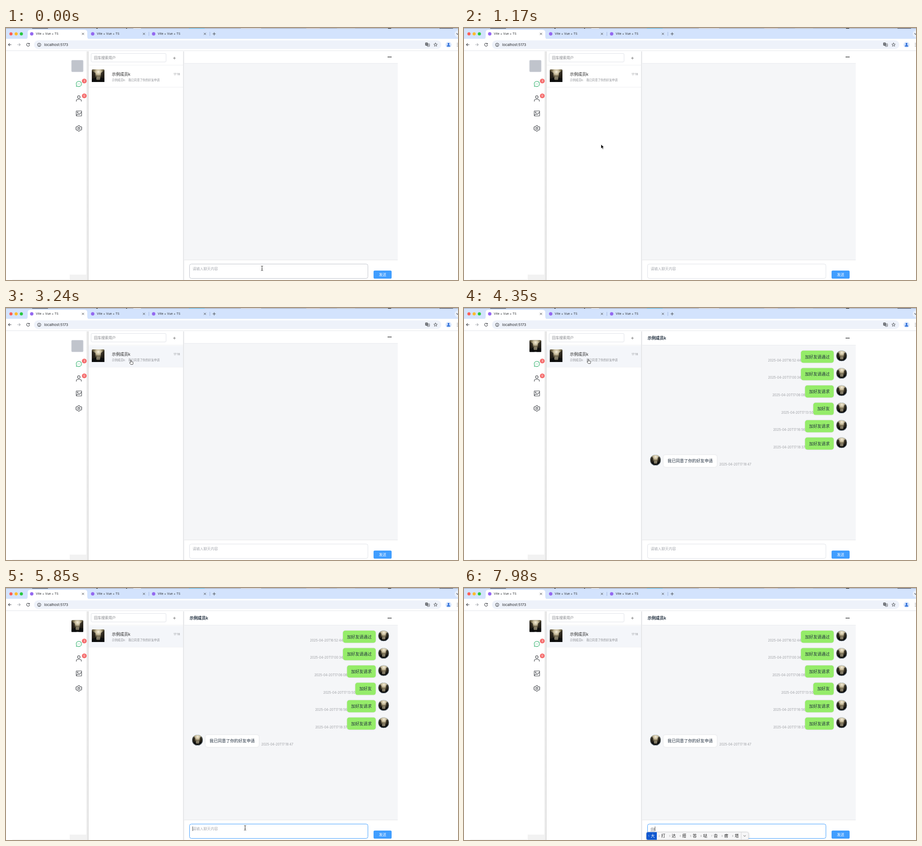
An HTML page for the animation above (8 s loop, 1001 by 560 pixels).

```html
<!DOCTYPE html>
<html>
<head>
<meta charset="utf-8">
<title>Chat demo</title>
<style>
  html, body { margin: 0; width: 100%; height: 100%; overflow: hidden; background: #fff; }
  svg { display: block; }
  text { font-family: Inter, "Noto Sans CJK SC", "Noto Sans CJK", sans-serif; white-space: pre; }
  .line { fill: none; stroke: #484b50; stroke-linecap: round; stroke-linejoin: round; }
</style>
</head>
<body>
<svg width="1001" height="560" viewBox="0 0 1001 560">
  <defs>
    <linearGradient id="wall" x2="0" y2="1">
      <stop offset="0" stop-color="#5b5239"/><stop offset=".5" stop-color="#37301f"/><stop offset="1" stop-color="#0d0e0d"/>
    </linearGradient>
    <radialGradient id="glow" cx=".52" cy=".2" r=".5">
      <stop offset="0" stop-color="#f7f0dc"/><stop offset=".45" stop-color="#d8cba8" stop-opacity=".85"/><stop offset="1" stop-color="#8a7c58" stop-opacity="0"/>
    </radialGradient>
    <linearGradient id="edge">
      <stop offset="0" stop-color="#f7f7f7"/><stop offset="1" stop-color="#dcdcdc"/>
    </linearGradient>
    <clipPath id="round"><circle cx="14" cy="14" r="14"/></clipPath>
    <g id="photo">
      <rect width="28" height="28" rx="2" fill="url(#wall)"/>
      <rect width="28" height="28" rx="2" fill="url(#glow)"/>
      <path d="M0 3L8 8V17L0 21ZM28 2L20 8V17L28 21Z" fill="#1d1a14" opacity=".75"/>
      <path d="M11 16H18L20 23H9Z" fill="#a59c83" opacity=".7"/>
      <path d="M0 21L9 18L12 28H0ZM28 20L19 18L17 28H28Z" fill="#0c0d0d"/>
    </g>
    <g id="face">
      <g transform="scale(.857) translate(-14 -14)" clip-path="url(#round)"><use href="#photo"/></g>
      <circle r="11.7" fill="none" stroke="#c5dcf2" stroke-width=".7"/>
    </g>
  </defs>

  <!-- browser -->
  <rect width="1001" height="25" fill="#d3e3fd"/>
  <g id="strip"></g>
  <circle cx="11" cy="13" r="3.5" fill="#ff5f57"/>
  <circle cx="22.5" cy="13" r="3.5" fill="#febc2e"/>
  <circle cx="34" cy="13" r="3.5" fill="#28c840"/>
  <path d="M42 25Q48 25 48 19V10Q48 4 54 4H174Q180 4 180 10V19Q180 25 186 25Z" fill="#fff"/>
  <rect y="24" width="1001" height="27" fill="#fff"/>
  <rect x="62" y="27.5" width="902" height="19" rx="9.5" fill="#eef2fa"/>
  <path d="M0 50.5H1001" stroke="#e3e5e9"/>
  <g id="tabs"></g>
  <circle cx="1001" cy="13" r="7.5" fill="#e8f0fe"/>
  <g class="line" stroke-width="1.1">
    <path d="M316.5 9V17M451.5 9V17" style="stroke:#a4b9df"/>
    <path d="M458 13H464M461 10V16M998 12L1000.500 14.500"/>
    <path d="M11.500 37H5.500M8 34.300L5.300 37L8 39.700"/>
    <path d="M25.500 37H31.500M29 34.300L31.700 37L29 39.700" style="stroke:#a9acb1"/>
    <path d="M51.600 35.200A3.300 3.300 0 1 0 52.100 38M52 33.700V35.800H49.800"/>
    <circle cx="73.500" cy="37.300" r="3.600"/><path d="M73.500 37V39M73.500 35.300V35.400"/>
    <path d="M951.300 33.200L952.400 35.800L955.200 36L953.100 37.800L953.800 40.600L951.300 39.100L948.800 40.600L949.500 37.800L947.400 36L950.200 35.800Z" stroke-width=".9"/>
    <rect x="932.500" y="35" width="5.500" height="6" rx=".7" stroke-width=".8"/>
    <path d="M934 39.500L935.300 36.500L936.600 39.500" stroke-width=".7"/>
  </g>
  <rect x="928.500" y="32.500" width="5.500" height="6.500" rx=".8" fill="#50545a"/>
  <path d="M929.700 34.800H932.800M931.200 34V34.800M932.300 35L930 37.500M930.300 35.500L932.500 37.500" stroke="#fff" stroke-width=".5"/>
  <circle cx="980" cy="37.300" r="6.500" fill="#d3e3fd"/>
  <circle cx="980" cy="35.500" r="1.900" fill="#0b57d0"/><path d="M976.300 41Q976.300 38.300 980 38.300T983.700 41Z" fill="#0b57d0"/>
  <path d="M999.500 33.500V34.500M999.500 36.800V37.800M999.500 40.100V41.100" stroke="#484b50" stroke-width="1.500"/>

  <!-- side bar -->
  <rect x="177.500" y="52" width="5.500" height="508" fill="url(#edge)"/>
  <rect x="141" y="548" width="37" height="12" fill="#f2f2f2"/>
  <path d="M14 559.500H140" stroke="#f1f1f1"/>
  <rect x="145" y="71.500" width="26" height="26" rx="2" fill="#c0c4cc" stroke="#d9dce2"/>
  <g class="line" stroke-width="1.100">
    <g style="stroke:#2aae67"><path d="M155.700 129.800L156.200 127.200A6 5.800 0 1 1 158.200 129.200Z"/><path d="M158.700 124.300H158.800M161.400 124.300H161.500M164.100 124.300H164.200" stroke-width="1.300"/></g>
    <circle cx="161.300" cy="153.500" r="2.900"/><path d="M155.800 163V161.500Q155.800 158.800 158.500 158.800H164.100Q166.800 158.800 166.800 161.500V163"/>
    <rect x="155.500" y="184.300" width="12" height="11.200" rx=".8"/><circle cx="158.800" cy="187.500" r=".9"/><path d="M155.800 194L160 190.500L162 192.200L167.300 187"/>
    <circle cx="161.300" cy="223" r="2.100"/>
    <path d="M159.800 216.800H162.800L163.500 218.700L165.300 219.700L167.200 219.300L168 222L166.700 223L168 224.300L166.800 226.800L164.900 226.500L163.400 227.400L162.700 229.300H159.900L159.200 227.400L157.600 226.500L155.700 226.800L154.600 224.200L155.900 223L154.600 221.700L155.700 219.300L157.600 219.600L159.200 218.700Z"/>
  </g>
  <g fill="#f56c6c"><circle cx="173.400" cy="117.700" r="5.300"/><circle cx="173.400" cy="150.700" r="5.300"/></g>

  <!-- conversation list -->
  <path d="M183 560V55Q183 52 186 52H390Q393 52 393 55V560Z" fill="#fff"/>
  <path d="M183.500 82.500H392M183.500 131.500H392" stroke="#eff0f2"/>
  <rect id="item" x="183" y="84" width="209.500" height="47.500" fill="#f4f6fa"/>
  <rect x="188.500" y="56.500" width="166" height="19" rx="2.500" fill="#fff" stroke="#dfe2e8"/>
  <path class="line" d="M370.500 67H375.500M373 64.500V69.500" style="stroke:#777"/>
  <use href="#photo" x="190" y="92"/>

  <!-- conversation -->
  <rect x="392" y="52" width="2.500" height="508" fill="#e6e7e9"/>
  <rect id="area" x="394.500" width="473" fill="#f5f6f8"/>
  <path id="rule" stroke="#e9ebee"/>
  <path d="M394.500 515.500H867.500" stroke="#e4e5e8"/>
  <g id="dots" fill="#303133"><circle cx="846.500" r="1.150"/><circle cx="849.500" r="1.150"/><circle cx="852.500" r="1.150"/></g>
  <rect id="box" x="406.500" y="524.500" width="395" height="32" rx="4" fill="#fff"/>
  <rect x="814" y="539" width="40" height="18" rx="2.800" fill="#409eff"/>
  <g id="labels"></g>
  <g id="chat"><use href="#photo" transform="translate(145 71.500) scale(.93)"/></g>

  <g id="prompt"></g>
  <g id="typed"></g>
  <path id="caret" stroke="#222" stroke-width=".8"/>
  <g id="ime"></g>

  <g id="cursor">
    <path d="M0 0V9.500L2.200 7.500L3.800 11L5.300 10.300L3.800 7H6.700Z" fill="#000" stroke="#fff" stroke-width=".7"/>
    <path d="M-.8 6V.7Q0-.5.9.7V3.800L4.500 4.800Q5.400 5.200 5.200 6.500L4.300 10H-.3L-3 6.500Q-2.800 5-1.500 5.600Z" fill="#fff" stroke="#222" stroke-width=".8"/>
    <path d="M-2.300-5.200Q0-5.200 0-4Q0-5.200 2.300-5.200M0-4.200V4.200M-2.300 5.200Q0 5.200 0 4Q0 5.200 2.300 5.200M-1 1.500H1" fill="none" stroke="#222" stroke-width=".9"/>
  </g>
</svg>
<script>
const $ = id => document.getElementById(id);
const add = (id, markup) => $(id).insertAdjacentHTML('beforeend', markup);
const text = (id, x, y, size, color, str, extra = '') =>
  add(id, `<text x="${x}" y="${y}" font-size="${size}" fill="${color}" ${extra}>${str}</text>`);
const END = 'text-anchor="end"', MID = 'text-anchor="middle"';
const NAME = '示例成员k', REPLY = '我已同意了你的好友申请';

// sliver of the windows behind the browser
add('strip', '<rect width="1001" height="1.500" fill="#a9b2c2"/>');
[[58, 35, '#45484f'], [200, 3, '#222'], [266, 2, '#222'], [282, 17, '#e8e8e8'], [405, 35, '#6fc0e6'],
 [520, 45, '#d9dade'], [665, 30, '#d5c9c7'], [733, 40, '#c3c8ce'], [846, 7, '#222'], [960, 30, '#555a66']]
  .forEach(([x, w, c]) => add('strip', `<rect x="${x}" width="${w}" height="1.300" fill="${c}"/>`));

for (const x of [0, 135, 270]) {
  add('tabs', `<circle cx="${57 + x}" cy="13" r="3.800" fill="#9468f0"/>
    <path class="line" d="M${168.5 + x} 11l4 4m0-4l-4 4"/>`);
  text('tabs', 66 + x, 15.300, 6.750, '#2b2d31', 'Vite + Vue + TS');
}
text('labels', 84.500, 40, 7.900, '#25272b', 'localhost:5173');
text('labels', 173.400, 120.200, 6.500, '#fff', '3', MID);
text('labels', 173.400, 153.200, 6.500, '#fff', '0', MID);
text('labels', 195, 69, 8, '#7f8186', '回车搜索用户');
text('labels', 234.500, 105.500, 9, '#222', NAME);
text('labels', 385.500, 104.600, 6.300, '#8b8d92', '17:18', END);
text('labels', 234.500, 117.700, 6.300, '#8b8d92', NAME + ':');
text('labels', 271, 117.700, 6.300, '#8b8d92', REPLY);
text('labels', 834, 551, 8, '#fff', '发送', MID);
text('prompt', 413.300, 537.500, 8, '#a8abb2', '请输入聊天内容');

// messages
text('chat', 406.500, 70, 9, '#1f2d3d', NAME, 'font-weight="600"');
const bubble = (x, y, w, fill, str) => {
  add('chat', `<rect x="${x}" y="${y}" width="${w}" height="27" rx="5" fill="${fill}" style="filter:drop-shadow(0 .5px 1px #0002)"/>`);
  text('chat', x + 9, y + 16.700, 9.100, '#1f2d3d', str);
};
const stamp = (x, y, time, extra) => text('chat', x, y + 24, 6.900, '#9a9ca1', '2025-04-20T' + time, extra);
const face = (x, y) => add('chat', `<use href="#face" x="${x}" y="${y + 11.500}"/>`);
[['加好友请通过', '16:52:44'], ['加好友请通过', '17:00:34'], ['加好友请求', '17:06:08'],
 ['加好友', '17:13:50'], ['加好友请求', '17:16:56'], ['加好友请求', '17:18:37']].forEach(([str, time], i) => {
  const y = 94.800 + 38.600 * i, w = 18 + 9.100 * str.length, x = 818.800 - w;
  bubble(x, y, w, '#95ec69', str);
  stamp(x, y, time, END);
  face(836.300, y);
});
bubble(441.800, 326.400, 118.200, '#fff', REPLY);
stamp(565.500, 326.400, '17:18:47');
face(424, 326.400);

// input method candidates
add('ime', `<rect x="404" y="542.500" width="226" height="17" rx="3.500" fill="#f6f6f7" stroke="#c9cacd" stroke-width=".7" style="filter:drop-shadow(0 1px 2px #0003)"/>
  <path d="M427 542.500H407.500Q404 542.500 404 546V556Q404 559.500 407.500 559.500H427Z" fill="#0f58d0"/>
  <path d="M614 543V559" stroke="#d5d6d8"/><path class="line" d="M619.300 550l2.200 2 2.200-2" style="stroke:#555"/>`);
[...'大打达搭答哒沓瘩塔'].forEach((c, i) => {
  const x = 418 + 23.250 * i;
  text('ime', x - 9, 553, 4.500, i ? '#888' : '#fff', i + 1, MID);
  text('ime', x, 554.200, 9, i ? '#222' : '#fff', c, MID);
});

// pointer stops: time, x, y
const stops = [[0, 567, 534], [450, 567, 534], [870, 333, 295], [1050, 333, 295], [1170, 303.500, 258.500],
  [1650, 303.500, 258.500], [2010, 276.500, 115.500], [3240, 276.500, 115.500], [3241, 275.500, 113.500], [4800, 275.500, 113.500],
  [5250, 475, 430], [5430, 475, 430], [5760, 529.500, 533], [6630, 529.500, 533], [6870, 420.500, 534.500], [8000, 420.500, 534.500]];
function pointer(t) {
  const i = stops.findIndex(s => s[0] > t), [a, x, y] = stops[i - 1], [b, u, v] = stops[i];
  const p = (t - a) / (b - a), e = p * p * (3 - 2 * p);
  return [x + (u - x) * e, y + (v - y) * e];
}
const show = (el, on) => el.style.display = on ? '' : 'none';
let shown = '';

function draw(now) {
  const t = Math.floor(now % 8000 / 30) * 30;
  const [x, y] = pointer(t);
  const inBox = x > 406 && x < 802 && y > 524;
  const inItem = x > 183 && x < 392 && y > 84 && y < 131;
  const open = t >= 4320, focus = t >= 5710;

  $('cursor').setAttribute('transform', `translate(${x} ${y})`);
  show($('cursor'), t < 7230);
  [!inBox && !inItem, inItem, inBox].forEach((on, i) => show($('cursor').children[i], on));
  show($('item'), inItem || open);
  show($('chat'), open);

  const top = open ? 82 : 78;
  $('area').setAttribute('y', top);
  $('area').setAttribute('height', 515 - top);
  $('rule').setAttribute('d', `M394.500 ${top + .5}H867.500`);
  $('dots').setAttribute('transform', `translate(0 ${open ? 67 : 64.500})`);
  $('box').setAttribute('stroke', focus ? '#409eff' : inBox ? '#c0c4cc' : '#dfe2e8');

  const typed = t < 7650 ? '' : t < 7920 ? 'd' : 'da';
  if (typed !== shown) {
    $('typed').replaceChildren();
    if (typed) {
      text('typed', 413.300, 537.500, 8, '#6f7278', typed);
      add('typed', `<path d="M413 540H${413 + 4.800 * typed.length}" stroke="#777" stroke-width=".8"/>`);
    }
    shown = typed;
  }
  show($('prompt'), t < 7410);
  show($('ime'), t >= 7920);
  show($('caret'), focus && (t < 6210 || t >= 6690 && t < 7410 || t >= 7650));
  $('caret').setAttribute('d', `M${413.500 + 4.800 * typed.length} 530V540`);
  requestAnimationFrame(draw);
}
const start = performance.now();
requestAnimationFrame(function first() {
  stops.push([9000, 420.500, 534.500]);
  (function loop() { draw.call(null, 0); })();
});
// run on elapsed time since load
const frame = draw;
draw = now => frame(Math.max(0, performance.now() - start));
</script>
</body>
</html>
```
